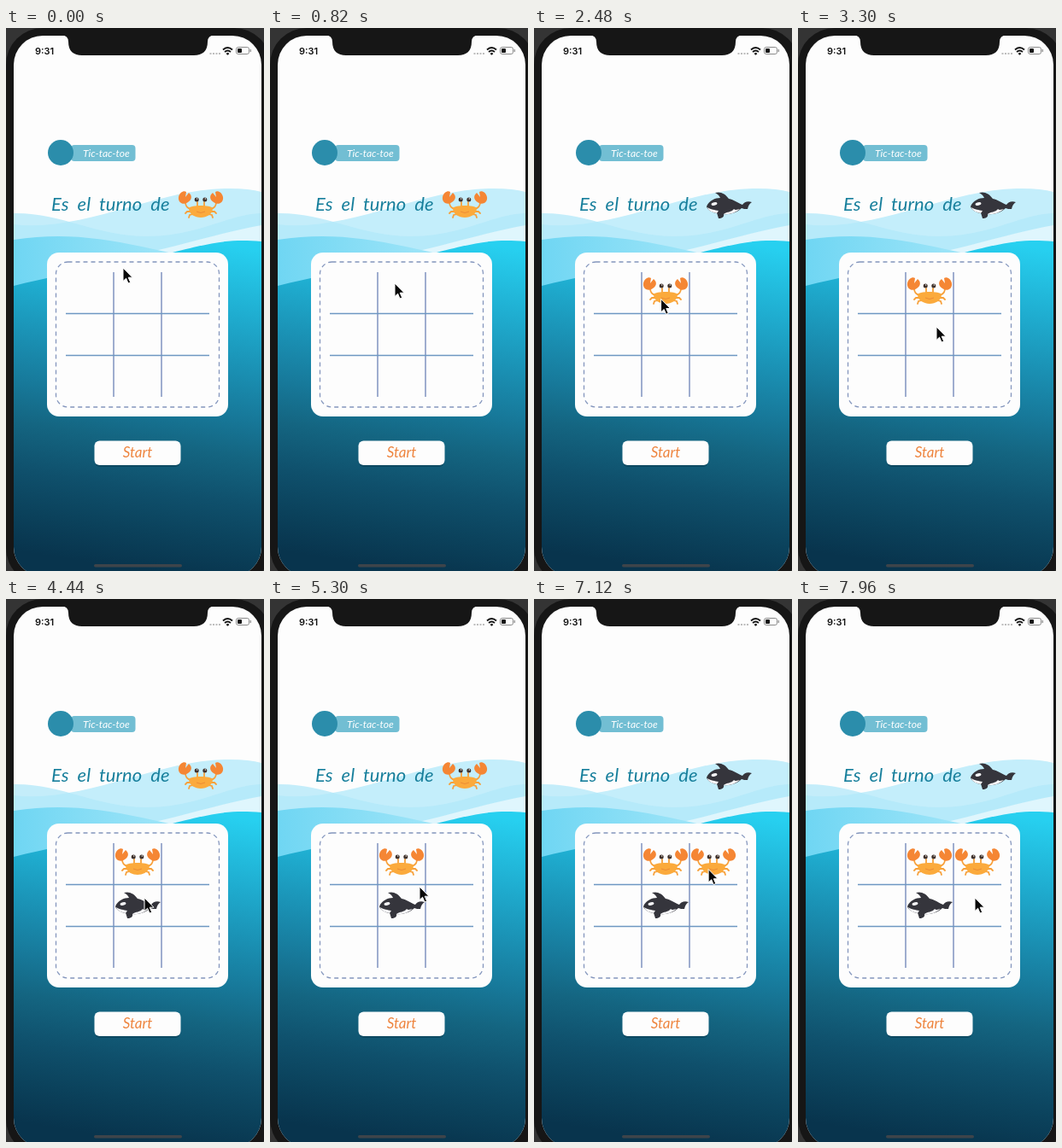
Write an HTML page that moves like this. It is 302x636 px and loops after 8 s.

```html
<!DOCTYPE html>
<html lang="es">
<head>
<meta charset="utf-8">
<title>Tic-tac-toe</title>
<style>
  html, body { margin: 0; width: 100%; height: 100%; overflow: hidden; background: #161616; }
  svg { display: block; width: 302px; height: 636px; }
  .script { font-family: Lato, cursive; font-style: italic; }
  .clock { font: 600 11px Inter, sans-serif; fill: #111; }
</style>
</head>
<body>
<svg viewBox="0 0 302 636">
  <defs>
    <clipPath id="screen"><rect x="9" y="9" width="290" height="633" rx="34"/></clipPath>
    <linearGradient id="sea" gradientUnits="userSpaceOnUse" x1="200" y1="245" x2="140" y2="632">
      <stop offset="0" stop-color="#27d0f0"/>
      <stop offset=".2" stop-color="#1fadd0"/>
      <stop offset=".37" stop-color="#1a8fb2"/>
      <stop offset=".5" stop-color="#17799a"/>
      <stop offset=".62" stop-color="#146581"/>
      <stop offset=".76" stop-color="#0f506c"/>
      <stop offset=".88" stop-color="#0b425c"/>
      <stop offset="1" stop-color="#08344d"/>
    </linearGradient>
    <linearGradient id="swell">
      <stop offset="0" stop-color="#6fd6f3"/>
      <stop offset="1" stop-color="#a0e5f8"/>
    </linearGradient>

    <g id="crab">
      <g fill="none" stroke="#f7a03a" stroke-width="1.8" stroke-linecap="round">
        <path id="limbs" d="M-11 5Q-18 4-18-3M-11 8l-5 0-2 2M-9 11l-4 1-1 3M-4 2v-5"/>
        <use href="#limbs" transform="scale(-1 1)"/>
      </g>
      <g fill="#f58634">
        <path id="claw" d="M-15-3C-20 1-27-2-26-9C-25-14-20-17-17-15L-18-9L-14-14C-10-11-10-6-15-3Z"/>
        <use href="#claw" transform="scale(-1 1)"/>
      </g>
      <path d="M-14 4C-12 0 12 0 14 4C14 11 7 15 0 15C-7 15-14 11-14 4Z" fill="#fbaa3c"/>
      <path d="M-5 8Q0 11 5 8" fill="none" stroke="#ec8c35"/>
      <g fill="#40322c"><circle cx="-4.8" cy="-6" r="2.5"/><circle cx="4.8" cy="-6" r="2.5"/></g>
      <g fill="#fff"><circle cx="-4.3" cy="-7" r=".7"/><circle cx="5.3" cy="-7" r=".7"/></g>
    </g>

    <g id="orca">
      <path d="M-26 2C-23-5-16-8-10-8C-11-11-14-13-16-14C-10-16-4-13 0-7C6-6 11-2 16 0C18-3 22-5 27-3C24-1 23 1 22 5C19 5 17 5 15 4C10 9 1 12-6 11C-5 14-8 16-12 16C-13 13-13 12-14 10C-20 9-25 6-26 2Z" fill="#35353c"/>
      <path d="M-25 3C-21 6-16 6-12 7L-14 10C-19 9-24 7-25 3ZM-6 11C-2 8 3 9 6 5C8 7 11 5 13 5C8 9 1 12-6 11Z" fill="#f6f6f8"/>
      <ellipse cx="-17" cy="-1" rx="3.5" ry="1.8" transform="rotate(-12 -17 -1)" fill="#f6f6f8"/>
    </g>
  </defs>

  <rect width="302" height="636" fill="#343434"/>
  <rect width="310" height="652" rx="43" fill="#161616"/>

  <g clip-path="url(#screen)">
    <rect x="9" y="9" width="290" height="627" fill="#fdfdfd"/>
    <path d="M9 230C90 240 180 187 262 188Q285 188 299 192V330H9Z" fill="#c4eefb"/>
    <path d="M9 217C65 216 105 244 165 244S260 218 299 217V330H9Z" fill="#b2e9fa" opacity=".75"/>
    <path d="M170 262C215 252 250 240 299 231V330H170Z" fill="#dff6fd"/>
    <path d="M9 248C75 238 125 248 195 264V330H9Z" fill="url(#swell)"/>
    <path d="M9 302C85 283 145 276 195 263S265 247 299 250V636H9Z" fill="url(#sea)"/>
    <rect x="103" y="628" width="103" height="3.5" rx="1.7" fill="#3e444a"/>
  </g>

  <path d="M65 8Q73 9 73 16C73 27 79 32 89 32H220C230 32 236 27 236 16Q236 9 244 8Z" fill="#161616"/>
  <text class="clock" x="34" y="30.5">9:31</text>
  <path d="M238.5 30H251" stroke="#bdbdbd" stroke-width="2" stroke-dasharray="2 1.5"/>
  <g fill="none" stroke="#151515" stroke-width="1.8">
    <path d="M254 25.5Q259.5 20.5 265 25.5M256 28Q259.5 25 263 28"/>
    <path d="M258.3 29.5L259.5 30.6L260.7 29.5"/>
  </g>
  <rect x="269.5" y="22.5" width="15" height="8" rx="2.3" fill="none" stroke="#8a8a8a"/>
  <rect x="271" y="24" width="5" height="5" rx="1" fill="#151515"/>
  <path d="M286.3 25v3" stroke="#8a8a8a" stroke-width="1.2"/>

  <rect x="76" y="137" width="75.5" height="19" rx="4" fill="#72bed3"/>
  <circle cx="64" cy="146" r="15" fill="#2b8dab"/>
  <text class="script" x="90" y="151" font-size="12" fill="#fff">Tic-tac-toe</text>

  <text class="script" x="53" y="214" font-size="22" word-spacing="5" fill="#177f9c">Es el turno de</text>
  <use id="turn" href="#crab" x="228" y="207"/>

  <rect x="48" y="263" width="212" height="192" rx="14" fill="#fdfdfd"/>
  <rect x="58.5" y="274" width="191" height="170" rx="14" fill="none" stroke="#8496bd" stroke-width="1.3" stroke-dasharray="5 4"/>
  <path d="M126 286V432M182 286V432" stroke="#8092c0" stroke-width="1.5"/>
  <path d="M70 334.5H238M70 383.5H238" stroke="#6d97c2" stroke-width="1.5"/>
  <g id="pieces"></g>

  <rect x="104" y="486" width="100" height="28" rx="6" fill="#062b3d" opacity=".35"/>
  <rect x="103.5" y="483.5" width="101" height="28.5" rx="6" fill="#fdfdfd"/>
  <text class="script" x="154" y="503" font-size="17" text-anchor="middle" fill="#ee853f">Start</text>

  <path id="cursor" d="M0 0V15.5L3.6 12.2L6 18L8.7 16.9L6.2 11.2H11Z" fill="#090909" stroke="#fff" stroke-width="1" stroke-linejoin="round"/>
</svg>

<script>
const LOOP = 8000;
const moves = [
  { time: 1500, player: 'crab', x: 154, y: 308 },
  { time: 3900, player: 'orca', x: 154, y: 358 },
  { time: 6800, player: 'crab', x: 210, y: 308 },
];
// time, x, y of the pointer tip
const pointerPath = [
  [0, 137, 281], [820, 146, 299], [1400, 146, 311], [2200, 146, 311],
  [3300, 162, 350], [4500, 162, 350], [5300, 175, 337],
  [6420, 204, 315], [7000, 204, 315], [7960, 207, 350], [LOOP, 207, 350],
];

const byId = id => document.getElementById(id);
const turn = byId('turn');
const cursor = byId('cursor');
const ease = p => p * p * (3 - 2 * p);

for (const move of moves) {
  move.piece = document.createElementNS('http://www.w3.org/2000/svg', 'use');
  move.piece.setAttribute('href', '#' + move.player);
  move.piece.setAttribute('x', move.x);
  move.piece.setAttribute('y', move.y);
  byId('pieces').append(move.piece);
}

function pointerAt(time) {
  const next = pointerPath.findIndex(point => point[0] > time);
  const [t0, x0, y0] = pointerPath[next - 1];
  const [t1, x1, y1] = pointerPath[next];
  const p = ease((time - t0) / (t1 - t0));
  return [x0 + (x1 - x0) * p, y0 + (y1 - y0) * p];
}

function draw(now) {
  const time = now % LOOP;
  let played = 0;
  for (const move of moves) {
    const visible = time >= move.time;
    move.piece.setAttribute('visibility', visible ? 'visible' : 'hidden');
    played += visible;
  }
  turn.setAttribute('href', played % 2 ? '#orca' : '#crab');
  cursor.setAttribute('transform', `translate(${pointerAt(time)})`);
}

const start = performance.now();
function tick() {
  draw(performance.now() - start);
  requestAnimationFrame(tick);
}
tick();
</script>
</body>
</html>
```
